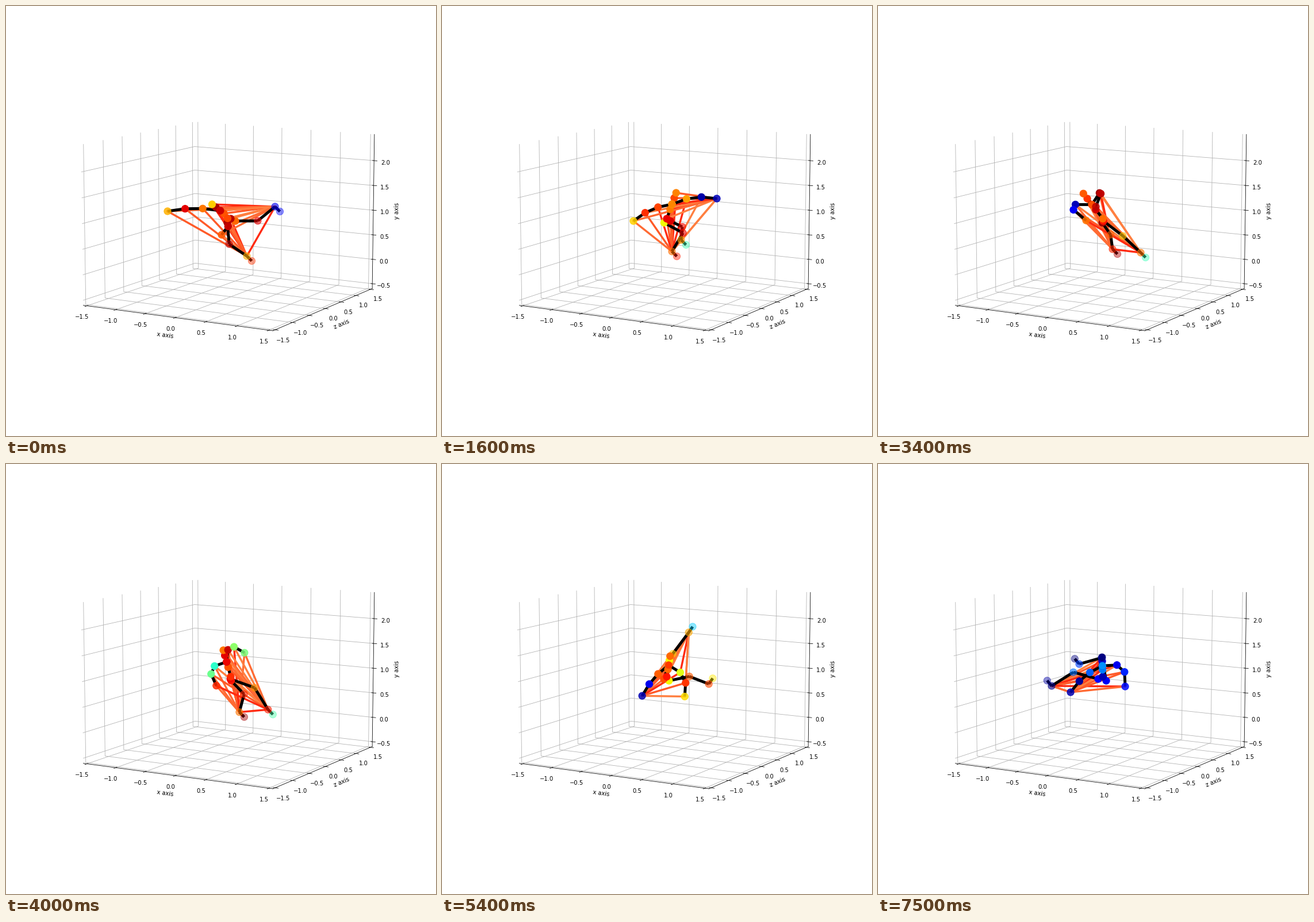
Recreate the animation shown at these times as a matplotlib script. Size 748 by 748 pixels, loop 7600 ms.

```python
import numpy as np
import matplotlib.pyplot as plt
from matplotlib.animation import FuncAnimation
from matplotlib.collections import LineCollection

SIZE, DPI = 748, 72
FRAMES, STEP = 76, 100
LAST = (FRAMES - 1) * STEP

# Joint numbers: torso 0-3 (hip, spine, neck, head), then four limbs of four
ARM_A, ARM_B, LEG_R, LEG_L = ([*range(i, i + 4)] for i in (4, 8, 12, 16))
HAND_A, HAND_B, ANKLE_R, ANKLE_L = ARM_A[3], ARM_B[3], LEG_R[2], LEG_L[2]
CHAINS = [[0, 1, 2, 3], [2] + ARM_A, [2] + ARM_B, [0] + LEG_R, [0] + LEG_L]
BONES = [pair for chain in CHAINS for pair in zip(chain, chain[1:])]
HIP = np.array([391, 370])

ALPHA = np.array([1] * 4 + [1, 1, 1, .85] * 2 + [1, .6, .6, .45] * 2)
ORDER = [*range(19, 11, -1), *range(12)]
SHADES = np.array(["#ff2a10", "#ff5a28", "#ff6a33", "#ff7f40"])

rng = np.random.default_rng(4)
times, poses, heat, rays_at = [], [], [], []


def key(ms, warmth, cold, hubs, neck, *limbs):
    """A key pose: neck position, then x, y and bend of hands and ankles."""
    times.append(ms)
    poses.append(np.concatenate([neck, *limbs]))
    value = warmth + rng.uniform(-.13, .17, 20)
    value[LEG_R[3]] *= .5
    value[cold[-2:]] = rng.uniform(0, .14, 2)
    heat.append(value)
    pairs = [(h, j) for h in hubs for j in range(12) if j != h] + [tuple(hubs)]
    rays_at.append((pairs, rng.choice(SHADES, len(pairs))))


key(0, .8, LEG_R, (ANKLE_L, ANKLE_R), (365, 350),
    (281, 357, 4), (375, 398, -12), (468, 349, 13), (419, 435, 16))
key(1600, .76, ARM_B, (ANKLE_L, HAND_B), (404, 334),
    (333, 374, 5), (478, 335, -6), (416, 407, -13), (400, 427, -27))
key(2400, .78, ARM_A, (ANKLE_R, HAND_A), (379, 326),
    (338, 377, 8), (431, 363, -9), (455, 421, 0), (431, 429, 3))
key(3400, .83, ARM_A[:3], (ANKLE_L, ANKLE_R), (364, 335),
    (362, 373, 27), (379, 349, -24), (457, 429, -2), (408, 423, -6))
key(4600, .82, ARM_B, (ANKLE_L, ANKLE_R), (398, 332),
    (364, 399, 4), (450, 325, -10), (452, 403, -24), (417, 432, -23))
key(5250, .74, ARM_A, (ANKLE_R, HAND_A), (396, 340),
    (350, 403, 4), (424, 398, -12), (440, 298, -10), (468, 390, -15))
key(6300, .66, ARM_A, (ANKLE_R, HAND_A), (393, 350),
    (339, 402, 4), (426, 411, -13), (311, 335, 17), (368, 336, 38))
key(LAST, .1, LEG_R, (ANKLE_R, HAND_A), (390, 343),
    (335, 397, 5), (430, 387, -18), (302, 386, 18), (350, 348, 30))

times, poses, heat = np.array(times, float), np.array(poses, float), np.array(heat)
slopes = np.gradient(poses, times, axis=0) * .7


def pose_at(ms):
    """Cubic Hermite path through the key poses."""
    i = min(np.searchsorted(times, ms, side="right") - 1, len(times) - 2)
    span = times[i + 1] - times[i]
    u = (ms - times[i]) / span
    ease = u * u * (3 - 2 * u)
    pose = (poses[i] + (poses[i + 1] - poses[i]) * ease
            + span * u * (1 - u) * ((1 - u) * slopes[i] - u * slopes[i + 1]))
    return pose, heat[i] + (heat[i + 1] - heat[i]) * u


def limb(root, tip, bend, parts):
    """Joints from root to tip, the inner ones pushed sideways by bend."""
    d = tip - root
    side = np.array([-d[1], d[0]]) / np.hypot(*d)
    f = np.linspace(0, 1, parts + 1)[:, None]
    return root + f * d + bend * side * ((f > 0) & (f < 1))


def skeleton(pose, ms):
    neck, ends = pose[:2], pose[2:].reshape(4, 3)
    up = neck - HIP
    parts = [HIP + np.outer([0, .45, 1, 1.25], up)]
    for x, y, bend in ends[:2]:
        parts.append(limb(HIP + .7 * up, np.array([x, y]), bend, 3))

    turn = np.cos(np.pi * ms / LAST)
    swing = np.clip((ms - 4300) / 2000, 0, 1)
    toe = np.radians(45 - 175 * swing * swing * (3 - 2 * swing))
    foot = 12 * np.array([np.cos(toe), np.sin(toe)])
    hips = HIP + np.array([[8 * turn, 4], [-6 * turn, 7]])
    for hip, (x, y, bend) in zip(hips, ends[2:]):
        ankle = np.array([x, y])
        parts += [limb(hip, ankle, bend, 2), [ankle + foot]]
    return np.vstack(parts)


fig = plt.figure(figsize=(SIZE / DPI, SIZE / DPI), dpi=DPI, facecolor="white")
ax = fig.add_subplot(projection="3d")
ax.view_init(elev=10, azim=-60)
ax.set_xlabel("x axis", labelpad=4.8)
ax.set_ylabel("z axis", labelpad=4.8)
ax.set_zlabel("y axis", labelpad=4.4)
ax.set_xticks(np.arange(-1.5, 1.6, .5))
ax.set_yticks(np.arange(-1.5, 1.6, .5))
ax.set_zticks(np.arange(-.5, 2.1, .5))
ax.tick_params(pad=4.2)
ax.set_xlim(-1.5625, 1.5625)
ax.set_ylim(-1.5625, 1.5625)
ax.set_zlim(-.6, 2.525)
for axis in (ax.xaxis, ax.yaxis, ax.zaxis):
    axis.set_pane_color((1, 1, 1, 0))

stage = fig.add_axes([0, 0, 1, 1], zorder=5)
stage.set_xlim(0, SIZE)
stage.set_ylim(SIZE, 0)
stage.axis("off")

rays = LineCollection([], linewidths=3.4, capstyle="projecting", zorder=1)
bones = LineCollection([], colors="black", linewidths=5, capstyle="butt", zorder=2)
stage.add_collection(rays)
stage.add_collection(bones)
dots = stage.scatter(np.zeros(20), np.zeros(20), s=150, zorder=3)


def draw(frame):
    ms = frame * STEP
    pose, value = pose_at(ms)
    xy = skeleton(pose, ms)
    pairs, shades = rays_at[np.abs(times - ms).argmin()]
    rays.set_segments([xy[list(p)] for p in pairs])
    rays.set_color(shades)
    bones.set_segments([xy[list(b)] for b in BONES])
    colors = plt.cm.jet(np.clip(value, 0, 1))
    colors[:, 3] = ALPHA
    dots.set_offsets(xy[ORDER])
    dots.set_color(colors[ORDER])
    return rays, bones, dots


anim = FuncAnimation(fig, draw, frames=FRAMES, interval=STEP, repeat=True, blit=False)
plt.show()
```
